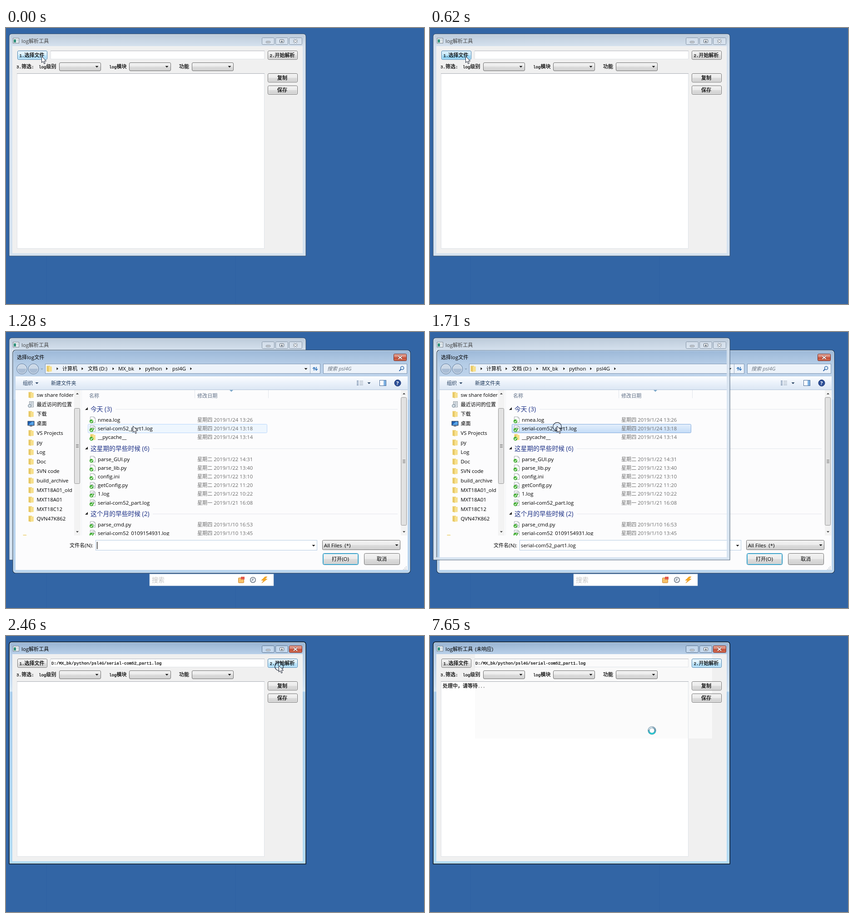
Animation of 920x609 px, one loop 8 s. Source, as an HTML page:

```html
<!DOCTYPE html>
<html lang="zh">
<head>
<meta charset="utf-8">
<style>
html, body { margin: 0; width: 100%; height: 100%; overflow: hidden; background: #3265a5; }
svg { display: block; width: 100%; height: 100%; }
text { white-space: pre; }
.ui { font-family: "Open Sans", "Noto Sans CJK SC", "Noto Sans CJK", sans-serif; }
.mono { font-family: "Liberation Mono", "Noto Sans CJK SC", "Noto Sans CJK", monospace; }
</style>
</head>
<body>
<svg id="stage" viewBox="0 0 920 609" xmlns="http://www.w3.org/2000/svg"></svg>
<script>
const LOOP = 8000;

// ---- markup helpers ----
const rect = (x, y, w, h, fill, more = '') =>
  `<rect x="${x}" y="${y}" width="${w}" height="${h}" fill="${fill}" ${more}/>`;
const box = (x, y, w, h, fill, stroke, r = 0) =>
  rect(x + .5, y + .5, w - 1, h - 1, fill, `stroke="${stroke}" rx="${r}"`);
const path = (d, fill, more = '') => `<path d="${d}" fill="${fill}" ${more}/>`;
const line = (d, color, w = 1) => path(d, 'none', `stroke="${color}" stroke-width="${w}"`);
const group = (id, body, more = '') => `<g id="${id}" ${more}>${body}</g>`;
const at = (x, y, body) => `<g transform="translate(${x} ${y})">${body}</g>`;

// Chinese and Latin runs have their own sizes.
function text(x, y, s, { cls = 'ui', latin = 11.4, han = 11.1, fill = '#000', more = '' } = {}) {
  const runs = s.match(/[\u3000-\uffef]+|[^\u3000-\uffef]+/g).map(run =>
    `<tspan font-size="${run[0] >= '\u3000' ? han : latin}">${run}</tspan>`);
  return `<text x="${x}" y="${y}" class="${cls}" fill="${fill}" ${more}>${runs.join('')}</text>`;
}
const mono = (x, y, s, fill = '#000') =>
  text(x, y, s, { cls: 'mono', latin: 9.2, han: 11, fill, more: `stroke="${fill}" stroke-width=".25"` });

const down = (x, y, s = 3.5, c = '#111') => path(`M${x - s} ${y - s / 2}h${2 * s}l${-s} ${s}z`, c);
const up = (x, y) => path(`M${x - 3} ${y + 1.5}h6l-3 -3z`, '#333');
const right = (x, y) => path(`M${x - 1.5} ${y - 3}v6l3.5 -3z`, '#111');

const gradient = (id, stops, y1, y2) =>
  `<linearGradient id="${id}" x1="0" x2="0" y1="${y1 ?? 0}" y2="${y2 ?? 1}"` +
  `${y1 === undefined ? '' : ' gradientUnits="userSpaceOnUse"'}>` +
  stops.map(([o, c]) => `<stop offset="${o}" stop-color="${c}"/>`).join('') + '</linearGradient>';

const defs = '<defs>' +
  gradient('btn', [[0, '#f3f3f3'], [.48, '#ebebeb'], [.5, '#dddddd'], [1, '#cfcfcf']]) +
  gradient('hot', [[0, '#eaf6fd'], [.48, '#d9f0fc'], [.5, '#bee6fd'], [1, '#a7d9f5']]) +
  gradient('deep', [[0, '#dcf0fb'], [.48, '#c8e9fa'], [.5, '#a5dcf8'], [1, '#86cdf0']]) +
  gradient('red', [[0, '#e6aa9c'], [.48, '#d67b69'], [.5, '#c04a35'], [1, '#d37055']]) +
  gradient('row', [[0, '#e4effc'], [1, '#c4dcf7']]) +
  gradient('bar', [[0, '#fbfdff'], [.5, '#eaf1fa'], [1, '#dce7f4']]) +
  gradient('idle', [[0, '#bccad9'], [.055, '#d5e1ee'], [.3, '#d9e5f2'], [1, '#d4e2f0']], 13, 503) +
  gradient('live', [[0, '#98b3d1'], [.055, '#b9d0e9'], [.2, '#cfe1f3'], [.222, '#d7e8f7'],
    [.226, '#a9cdec'], [1, '#b3dcf5']], 13, 503) +
  gradient('glass', [[0, '#9cb8d7'], [.06, '#b4cce6'], [.12, '#bfd4eb'], [.22, '#c8dbf0'],
    [.224, '#b4d0ec'], [1, '#b9d4ee']], 40, 532) +
  gradient('spin', [[0, '#9fb9c9'], [.4, '#5d93ab'], [.65, '#3fb2c6'], [1, '#1cd0d6']]) +
  '<clipPath id="list"><rect x="21" y="128" width="862" height="321"/></clipPath></defs>';

// ---- small icons, centred on 0,0 ----
const appIcon = box(-7, -6, 14, 12, '#f7fafc', '#77828c') + rect(-5, -3, 5, 7, '#2f8f7a') +
  rect(1, -3, 4, 3, '#c3d0da') + rect(1, 1, 4, 3, '#d9e1e7');
const folder = path('M-5.5 -6.5h7l1 1.5h3v11h-11z', '#eccd6b') + path('M-2 -5h7.5v11l-7.5 1z', '#f7e08c') +
  line('M-2 -5v12', '#cfa640', .8);
const page = path('M-5.5 -6.5h8l3 3v10h-11z', '#fff', 'stroke="#9aa0a6" stroke-width=".9"') +
  line('M2.5 -6.5v3h3', '#9aa0a6', .8);
const badge = '<circle cx="-3" cy="3.5" r="4.2" fill="#3fae2f"/>' + line('M-5.2 3.5l1.8 2 3 -4', '#fff', 1.3);
const logMark = line('M-3.5 -3h6M-3.5 -1h6', '#8f9a9f', .8) + line('M-3 2l2 2.5 4 -5', '#3c9b34', 2);
const gears = '<circle cx="-1.5" cy="0" r="2" fill="none" stroke="#778"/>' +
  '<circle cx="2" cy="2.5" r="1.7" fill="none" stroke="#8aa"/>';
const monitor = rect(-7, -5, 14, 9, '#1d5fb4', 'stroke="#234"') + path('M-6 3l8 -7h4v7z', '#58a4e8') +
  rect(-3, 5, 6, 1.5, '#667');
const recent = box(-4, -7, 10, 13, '#f3f6f8', '#8a949c') + line('M-2 -4h6M-2 -1h6M-2 2h6', '#789') +
  '<circle cx="-3" cy="3" r="3.3" fill="#d8e2e8" stroke="#678"/>';

// ---- main window ----
const OUTLINE = 'M13 13H654Q660 13 660 19V503H7V19Q7 13 13 13Z';
function frame(live) {
  const capFill = live ? 'rgba(215,230,246,.55)' : 'rgba(225,234,243,.5)';
  const capEdge = live ? '#59728f' : '#8494a6';
  const cap = x => box(x, 21, 28, 16, capFill, capEdge, 2);
  return path(OUTLINE + 'M14 40V497H653V40Z', `url(#${live ? 'live' : 'idle'})`, 'fill-rule="evenodd"') +
    line('M8.3 501.7V20Q8.3 14.3 14 14.3H653Q658.7 14.3 658.7 20V501.7Z', live ? '#d5ebf9' : '#e8f0f8', .8) +
    line(OUTLINE, live ? '#0c141c' : '#3d526a', live ? 1.5 : 1.1) +
    at(22, 28, appIcon) +
    cap(563) + cap(593) + box(623, 21, 29, 16, live ? 'url(#red)' : capFill, live ? '#7d2d24' : capEdge, 2) +
    box(572, 29, 10, 4, '#fff', '#4c5968', 1) + box(602, 25, 10, 8, '#fff', '#4c5968', 1) +
    box(605, 28, 4, 3, '#c9d5e2', '#4c5968') +
    line('M633 25.5l8 7M641 25.5l-8 7', live ? '#6d3a36' : '#4c5968', 3.6) +
    line('M633 25.5l8 7M641 25.5l-8 7', '#fff', 1.9);
}
const button = (id, x, y, tx, label) =>
  `<rect id="${id}" x="${x + .5}" y="${y + .5}" width="65" height="19" rx="2.5" fill="url(#btn)" stroke="#707070"/>` +
  rect(x + 1.5, y + 1.5, 63, 17, 'none', 'stroke="#fff" stroke-opacity=".65" rx="1.5"') +
  mono(tx, y + 14, label);
const combo = x => box(x, 76, 92, 19, 'url(#btn)', '#707070', 2.5) + down(x + 83, 85.5);

const mainWindow =
  group('idleFrame', frame(false)) + group('liveFrame', frame(true)) +
  text(34, 32.5, 'log解析工具', { more: 'id="title"' }) +
  group('noReply', text(99, 32.5, '(未响应)')) +
  rect(14, 40, 639, 457, '#f0f0f0') + rect(98, 50, 471, 19, '#fff') + rect(24, 100, 545, 387, '#fff') +
  group('ghost', rect(99, 40, 522, 186, '#fbfbfb', 'opacity=".85"')) +
  box(98, 50, 471, 19, 'none', '#e0e4e9') + line('M98 50.5h471', '#b4b7bd') +
  box(24, 100, 545, 387, 'none', '#dfe3e8') + line('M24 100.5h545', '#a9adb4') +
  button('pick', 25, 50, 29.5, '1.选择文件') +
  button('run', 576, 50, 580.5, '2.开始解析') +
  button('copy', 576, 100, 597, '复制') +
  button('save', 576, 127, 597, '保存') +
  mono(23, 89, '3.筛选:') + mono(72, 89, 'log级别') + mono(227, 89, 'log模块') + mono(381, 89, '功能') +
  combo(117) + combo(271) + combo(409) +
  group('filePath', mono(100, 63, 'D:/MX_bk/python/psl4G/serial-com52_part1.log')) +
  group('wait', mono(28, 114, '处理中，请等待') + mono(105, 114, '...', '#666'));

// ---- file dialog ----
const places = ['sw share folder', '最近访问的位置', '下载', '桌面', 'VS Projects', 'py', 'Log', 'Doc',
  'SVN code', 'build_archive', 'MXT18A01_old', 'MXT18A01', 'MXT18C12', 'QVN47K862'];
const placeIcons = { 1: recent, 3: monitor };
const sidebar = places.map((name, i) => {
  const y = 139 + 21 * i;
  return at(55, y, placeIcons[i] || folder) + text(67.5, y + 4, name);
}).join('') + at(43, 454, folder);

// name | date | plain icon
const sections = [
  [170, '今天 (3)', 241, ['nmea.log|四 2019/1/24 13:26|p', 'serial-com52_part1.log|四 2019/1/24 13:18|l',
    '__pycache__|四 2019/1/24 13:14|d']],
  [257, '这星期的早些时候 (6)', 323, ['parse_GUI.py|二 2019/1/22 14:31|p', 'parse_lib.py|二 2019/1/22 13:40|p',
    'config.ini|二 2019/1/22 13:10|p', 'getConfig.py|二 2019/1/22 11:20|g', '1.log|二 2019/1/22 10:22|l',
    'serial-com52_part.log|一 2019/1/21 16:08|l']],
  [401, '这个月的早些时候 (2)', 323, ['parse_cmd.py|四 2019/1/10 16:53|g',
    'serial-com52_0109154931.log|四 2019/1/10 13:45|l']]
];
const icons = { p: page, l: page + logMark, g: page + gears, d: folder };
let files = '', badges = '';
for (const [top, head, x, rows] of sections) {
  files += path(`M174 ${top + 2}h6v-6z`, '#222') + line(`M${x} ${top + .5}H862`, '#e3e6ec') +
    text(186, top + 5, head, { latin: 13.8, han: 13.75, fill: '#1e3287' });
  rows.forEach((row, i) => {
    const [name, date, kind] = row.split('|'), y = top + 23.6 + 19.2 * i;
    files += at(191, y, icons[kind]) + text(202, y + 4, name) +
      text(421, y + 4, '星期' + date, { fill: '#6d6d6d' });
    badges += at(191, y, badge);
  });
}
const scrollbar = (x, top, bottom) =>
  rect(x, 128, 14, 321, '#f3f3f3') + up(x + 7, 136) + down(x + 7, 441, 3, '#333') +
  box(x, top, 13, bottom - top, '#e2e2e2', '#969696', 2) +
  line([-3, 0, 3].map(d => `M${x + 4} ${(top + bottom) / 2 + d}h6`).join(''), '#666');
const navButton = x => `<circle cx="${x}" cy="81.5" r="11.3" fill="#a9bdd5" stroke="#627c9c"/>` +
  path(`M${x - 10} 81a10 10 0 0 1 20 0z`, '#cbd8e7') + `<circle cx="${x}" cy="81.5" r="10" fill="none" stroke="#e5edf5"/>`;
const crumbs = [[124, '计算机'], [180, '文档 (D:)'], [247, 'MX_bk'], [306, 'python'], [366, 'psl4G']];
const navy = { fill: '#1e395b' }, grey = { fill: '#5f6f86' };

const dialog =
  rect(15, 40, 875, 492, 'url(#glass)', 'stroke="#22364c" stroke-width="1.2" rx="6"') +
  rect(16.2, 41.2, 872.6, 489.6, 'none', 'stroke="#dceaf7" stroke-width=".8" rx="5"') +
  group('dlgIcon', at(30, 56, appIcon) + text(41, 60, '选择log文件')) +
  group('dlgPlain', text(24, 60, '选择log文件')) +
  box(853, 48, 29, 16, 'url(#red)', '#6f2a24', 2) +
  line('M863.5 53l8 6.5M871.5 53l-8 6.5', '#6d3a36', 3.4) + line('M863.5 53l8 6.5M871.5 53l-8 6.5', '#fff', 1.8) +
  navButton(35) + navButton(60.5) + down(79, 82, 3, '#8fa5be') +
  box(86, 70, 606, 22, '#edf3fa', '#8097b3') + line('M669.5 71v20', '#9db1c8') + at(95, 81, folder) +
  [113, 168, 236, 295, 354].map(x => right(x, 81)).join('') + group('lastCrumb', right(407, 81)) +
  crumbs.map(([x, s]) => text(x, 84.5, s)).join('') + down(660, 81.5) +
  line('M678 85v-7M675 81l3 -3 3 3M683 77v7M680 81.5l3 3 3 -3', '#2f72b8', 1.5) +
  box(698, 70, 185, 22, '#edf3fa', '#8097b3') +
  text(707, 84.5, '搜索 psl4G', { fill: '#6c7682', more: 'font-style="italic"' }) +
  '<circle cx="872" cy="79.5" r="3.6" fill="#dff0fb" stroke="#2d62a3" stroke-width="1.4"/>' + line('M869.5 82l-4 4', '#2d62a3', 2) +
  rect(21, 98, 863, 427, '#fcfcfd') + rect(21, 99, 863, 28, 'url(#bar)') + line('M21 127.5H884', '#b3c4d8') +
  text(37, 117, '组织', navy) + down(68, 113, 3.5, '#1e395b') + text(99, 117, '新建文件夹', navy) +
  line('M772 108.5h4M772 112.5h4M772 116.5h4', '#7188a6', 2) + line('M778 108.5h8M778 112.5h8M778 116.5h8', '#8b98a8') +
  down(799, 113, 3.5, '#1e395b') + box(822, 106, 15, 13, '#fff', '#4c6e98') + rect(831, 107, 5, 11, '#7fb2e4') +
  '<circle cx="862" cy="112.5" r="7" fill="#2c4f98" stroke="#1c3470"/>' +
  text(859, 116.5, '?', { fill: '#fff', more: 'font-weight="700"' }) +
  `<g clip-path="url(#list)">` + sidebar + scrollbar(150, 168, 335) + line('M166.5 128V449', '#eef1f5') +
  text(183, 144.5, '名称', grey) + text(421, 144.5, '修改日期', grey) +
  line('M415.5 128v18M577.5 128v18', '#e0e5ec') + path('M492 128h8l-4 4z', '#7aa7c9') +
  group('hover', box(180, 203, 395, 20, '#eef6fe', '#b8d6fb', 2)) +
  group('chosen', box(180, 203, 395, 20, 'url(#row)', '#84acdd', 2)) +
  files + group('badges', badges) + scrollbar(869, 144, 427) + '</g>' +
  text(140, 474.5, '文件名(N):') + box(197, 459, 488, 23, '#fff', '#b4cbe2') + down(677, 471.5) +
  group('caret', rect(200, 463, 1.2, 16, '#000')) + group('fileName', text(200, 475, 'serial-com52_part1.log')) +
  box(696, 459, 172, 22, 'url(#btn)', '#707070', 2) + text(700, 474.5, 'All Files  (*)') + down(860, 470.5) +
  box(697, 488, 79, 26, 'url(#btn)', '#2c7ea8', 3) + box(698, 489, 77, 24, 'none', '#48c8ee', 2) + text(717, 504.5, '打开(O)') +
  box(788, 488, 79, 26, 'url(#btn)', '#707070', 3) + text(816, 504.5, '取消') +
  [[880, 517], [877, 520], [880, 520], [874, 523], [877, 523], [880, 523]].map(([x, y]) => rect(x, y, 1.5, 1.5, '#aab4c0')).join('') +
  rect(316, 534, 273, 26, '#fff', 'stroke="#c3cfdd" stroke-width=".6"') + text(321, 552, '搜索', { han: 14, fill: '#c4c4c4' }) +
  box(511, 542, 13, 12, '#f6c069', '#c98533', 1) + rect(517, 540, 8, 6, '#e2594c') +
  '<circle cx="543.5" cy="547" r="5.8" fill="#eef1f5" stroke="#6a7483" stroke-width="1.5"/>' + line('M543.5 543.5v4h-3', '#456') +
  path('M570 540l-8 8h5l-4 6 12 -9h-5l5 -5z', '#f6a821', 'stroke="#e08a12" stroke-width=".6"');

// ---- pointer ----
const pointer =
  group('circle', '<circle cx="1" cy="2" r="9.3" fill="none" stroke="#1a2433" stroke-width="1.2"/>') +
  group('arrow', path('M.5 .5V14.5L3.7 11.6 6 17 8.2 16 6 11H10.5Z', '#fff', 'stroke="#1b2233" stroke-width="1"')) +
  group('beam', line('M-3 -7.5h2.4l.6 .6 .6 -.6h2.4M0 -7V6.5M-3 7h2.4l.6 -.6 .6 .6h2.4', '#111', 1.1)) +
  group('busy', '<circle r="7.2" fill="#fff" stroke="#6d8d9e" stroke-width="4"/>' +
    '<circle r="7.1" fill="none" stroke="url(#spin)" stroke-width="3"/>' +
    line('M-7 -1.5A7.1 7.1 0 0 1 1 -7', '#dbe7ee', 2));

const stage = document.getElementById('stage');
stage.innerHTML = defs + rect(0, 0, 920, 609, '#3265a5') +
  line('M89.5 504V609M505.5 504V609', 'rgba(30,75,140,.12)') +
  mainWindow + group('dialog', dialog) +
  group('overRing', frame(false) + text(34, 32.5, 'log解析工具', { fill: '#444' }), 'opacity=".9"') +
  group('pointer', pointer);

const part = {};
stage.querySelectorAll('[id]').forEach(e => part[e.id] = e);
// "inherit" keeps nested parts hidden along with their group.
const show = (id, on) => part[id].setAttribute('visibility', on ? 'inherit' : 'hidden');
const paint = (id, tone) => {
  part[id].setAttribute('fill', `url(#${tone})`);
  part[id].setAttribute('stroke', tone === 'btn' ? '#707070' : '#3c7fb1');
};

// time, x, y, shape: the pointer is sampled in steps
const track = [[0, 78, 62, 'arrow'], [1010, 122, 90, 'arrow'], [1160, 238, 172, 'arrow'], [1280, 279, 207, 'arrow'],
  [1860, 281, 208, 'beam'], [2010, 430, 137, 'beam'], [2160, 545, 88, 'arrow'], [2310, 593, 68, 'arrow'],
  [2460, 600, 65, 'arrow'], [2610, 587, 90, 'arrow'], [2760, 489, 208, 'arrow'], [7650, 488.5, 208.5, 'busy']];

function update(t) {
  const within = (a, b) => t >= a && t < b;
  const live = within(500, 620) || t >= 1860;
  show('idleFrame', !live);
  show('liveFrame', live);
  part.title.setAttribute('fill', live ? '#000' : '#444');
  show('noReply', t >= 7650);
  show('ghost', t >= 7650);
  show('filePath', t >= 1860);
  show('wait', t >= 2610);
  paint('pick', t < 500 ? 'hot' : t < 1860 ? 'deep' : 'btn');
  paint('run', t >= 2460 ? 'hot' : 'btn');

  show('dialog', within(770, 1860));
  show('dlgIcon', t < 890);
  show('dlgPlain', t >= 890);
  show('badges', t >= 1010);
  show('lastCrumb', t >= 1160);
  show('hover', within(1280, 1560));
  show('chosen', t >= 1560);
  show('caret', t < 1560);
  show('fileName', t >= 1560);
  show('overRing', within(1710, 1860));

  const [, x, y, shape] = track.filter(k => k[0] <= t).pop();
  part.pointer.setAttribute('transform', `translate(${x} ${y})`);
  for (const s of ['arrow', 'beam', 'busy']) show(s, s === shape);
  show('circle', within(500, 620) || within(1560, 1860) || within(2460, 2610));
}

const start = performance.now();
function tick(now) {
  update(Math.max(0, now - start) % LOOP);
  requestAnimationFrame(tick);
}
update(0);
requestAnimationFrame(tick);
</script>
</body>
</html>
```
